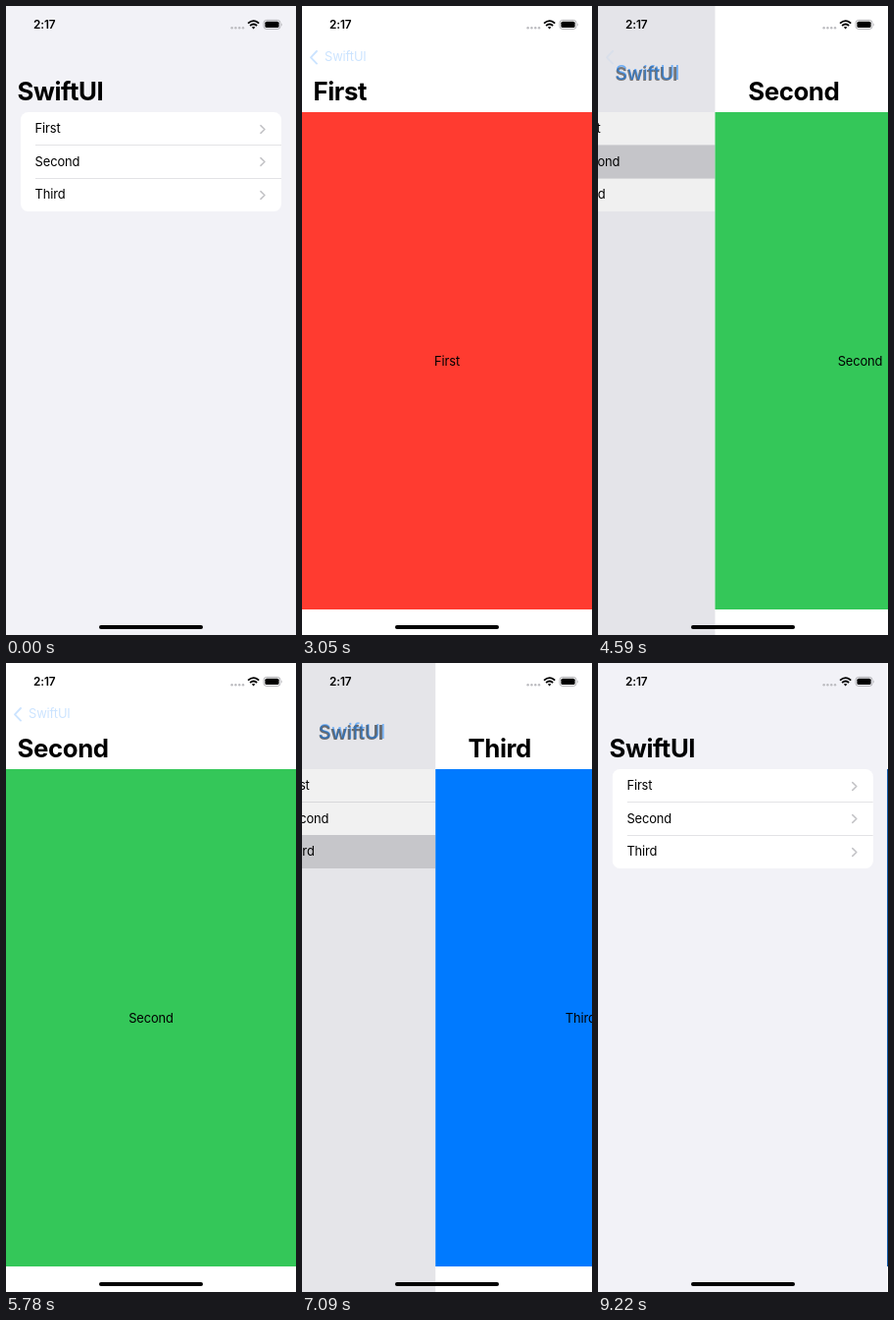
Recreate the animation shown at these times as an HTML page. Size 296x640 px, loop 9.32 s.

```html
<!DOCTYPE html>
<html lang="en">
<head>
<meta charset="utf-8">
<title>Navigation list</title>
<style>
  html, body { margin: 0; width: 100%; height: 100%; overflow: hidden; background: #f2f2f7; }
  #stage { position: absolute; left: 0; top: 0; width: 296px; height: 640px; overflow: hidden;
    font: 12.9px/20px Inter, "Open Sans", sans-serif; letter-spacing: -.12px; color: #000; }
  #stage div, #stage svg { position: absolute; white-space: nowrap; }
  .fill { left: 0; top: 0; width: 296px; height: 640px; }
  #list { background: #f2f2f7; }
  #card { left: 15px; top: 108px; width: 266px; height: 101px; border-radius: 7.6px; background: #fff; overflow: hidden; }
  .row { left: 0; width: 266px; height: 33.5px; }
  .row .tint { inset: 0; background: #d1d1d6; opacity: 0; }
  .row .name { left: 14.6px; top: 7.2px; }
  .row svg { left: 243px; top: 11.5px; }
  .line { left: 15px; width: 251px; height: 1px; background: #e3e3e6; }
  #dim { background: #000; }
  #panel { background: #fff; }
  #color { left: 0; top: 108px; width: 296px; height: 506px; }
  #label { left: 0; top: 351.5px; width: 296px; text-align: center; }
  .title { left: 0; top: 0; font-size: 25.8px; line-height: 36px; font-weight: 700; letter-spacing: -.4px; }
  .morph { transform-origin: 0 50%; }
  #small { left: 0; top: 0; color: #007aff; }
  #arrow { left: 7px; top: 44px; }
  #clock { left: 28px; top: 9px; font-size: 11.8px; font-weight: 600; letter-spacing: -.1px; }
  #home { left: 95px; top: 630px; width: 106px; height: 4px; border-radius: 2px; background: #000; }
</style>
</head>
<body>
<div id="stage">
  <div id="list" class="fill">
    <div id="card"></div>
    <div id="dim" class="fill" style="width:400px"></div>
  </div>
  <div id="panel" class="fill">
    <div id="color"></div>
    <div id="label"></div>
  </div>
  <div id="large" class="title morph">SwiftUI</div>
  <div id="small" class="morph">SwiftUI</div>
  <svg id="arrow" width="10" height="17" fill="none" stroke="#007aff" stroke-width="1.9" stroke-linecap="round" stroke-linejoin="round">
    <path d="M8 2L2 8.3L8 14.6"/>
  </svg>
  <div id="heading" class="title"></div>
  <div id="clock">2:17</div>
  <svg width="296" height="40" style="left:0;top:0">
    <g fill="#bcbcc0">
      <circle cx="230.6" cy="22.2" r="1.2"/><circle cx="234.4" cy="22.2" r="1.2"/>
      <circle cx="238.2" cy="22.2" r="1.2"/><circle cx="242" cy="22.2" r="1.2"/>
    </g>
    <g fill="none" stroke="#000" stroke-width="1.8">
      <path d="M247 17.6Q252.6 12.6 258.2 17.6"/>
      <path d="M249.1 20Q252.6 16.9 256.1 20"/>
    </g>
    <path d="M250.8 21.6Q252.6 20.2 254.4 21.6L252.6 23.5Z"/>
    <rect x="263" y="14.4" width="17" height="9" rx="2.8" fill="none" stroke="#a9a9ad" stroke-width=".9"/>
    <rect x="264.4" y="15.7" width="14.2" height="6.4" rx="1.6"/>
    <path d="M281.1 17.4Q282.6 18.9 281.1 20.4Z" fill="#a9a9ad"/>
  </svg>
  <div id="home"></div>
</div>
<script>
const $ = id => document.getElementById(id);
const WIDTH = 296, LOOP = 9320, STIFF = 18.26;
const pages = [['First', '#ff3b30'], ['Second', '#34c759'], ['Third', '#007aff']];

// start, end, steps, page, push?, phase of the spring at the first step
const moves = [
  [1570, 2020, 5, 0, true, .3],
  [3050, 3610, 6, 0, false, -1.9],
  [4370, 4830, 5, 1, true, 0],
  [5780, 6350, 6, 1, false, -1.9],
  [6980, 7430, 5, 2, true, -.2],
  [8660, 9220, 6, 2, false, -1.9],
];

$('card').innerHTML = pages.map(([name], i) =>
  (i ? `<div class="line" style="top:${i * 33.5 - .5}px"></div>` : '') +
  `<div class="row" style="top:${i * 33.5}px"><div class="tint"></div><div class="name">${name}</div>
   <svg width="8" height="11" fill="none" stroke="#c4c4c7" stroke-width="1.6" stroke-linecap="round" stroke-linejoin="round">
   <path d="M2 1.6L6 5.5L2 9.4"/></svg></div>`).join('');
const tints = [...document.querySelectorAll('.tint')];

const mix = (a, b, k) => a + (b - a) * k;
const rest = w => w <= 0 ? 1 : (1 + w) * Math.exp(-w);

// Elapsed time held at the last step reached
function heldTime(t, start, end, steps) {
  const at = k => k === steps - 1 ? end - start : Math.floor(k * (end - start) / (steps - 1) / 10) * 10;
  let k = 0;
  while (k < steps - 1 && t - start >= at(k + 1)) k++;
  return at(k);
}

function pose(t) {
  const move = moves.filter(m => t >= m[0]).pop();
  if (!move) return { page: 0, shown: 0, title: 0, x: WIDTH, tint: 0, back: 1 };
  const [start, end, steps, page, push, phase] = move;
  const held = heldTime(t, start, end, steps);
  const done = held === end - start;
  const w = held / 1000 * STIFF + phase;
  const left = s => push && done ? 0 : rest(w * s);
  const toShown = r => push ? 1 - r : r;
  const shown = toShown(left(1));
  let x = WIDTH * (1 - shown);
  if (!push) x = done ? WIDTH - 1 : Math.min(x, WIDTH - 1);
  return {
    page, shown, x,
    title: toShown(left(.87)),
    tint: push ? 1 : done ? 0 : shown,
    back: push ? 1 : Math.min(1, .2 + (1 - shown) * 3),
    edge: !push && done,
  };
}

const morph = (el, k, height, scale) => {
  el.style.transform = `translate(${mix(11.5, 23, k)}px,${mix(87.3, 52.2, k) - height / 2}px) scale(${scale})`;
};

function draw(t) {
  const p = pose(t), [name, color] = pages[p.page];
  $('list').style.transform = `translateX(${-.3 * WIDTH * p.shown}px)`;
  $('dim').style.opacity = .1 * p.shown;
  $('panel').style.transform = `translateX(${p.x}px)`;
  $('color').style.background = color;
  $('color').style.filter = p.edge ? 'brightness(.8) saturate(.75)' : 'none';
  $('label').textContent = $('heading').textContent = name;
  $('heading').style.transform = `translate(${11.5 + WIDTH * (1 - p.title)}px,69.3px)`;
  tints.forEach((el, i) => el.style.opacity = i === p.page ? p.tint : 0);

  morph($('large'), p.title, 36, mix(1, .47, p.title));
  morph($('small'), p.title, 20, mix(2.13, 1, p.title));
  $('large').style.opacity = 1 - p.title;
  $('small').style.opacity = p.title * p.back;
  $('arrow').style.opacity = Math.max(0, 2 * p.title - 1) * p.back;
}

const origin = performance.now();
function tick() {
  draw((performance.now() - origin) % LOOP);
  requestAnimationFrame(tick);
}
tick();
</script>
</body>
</html>
```
